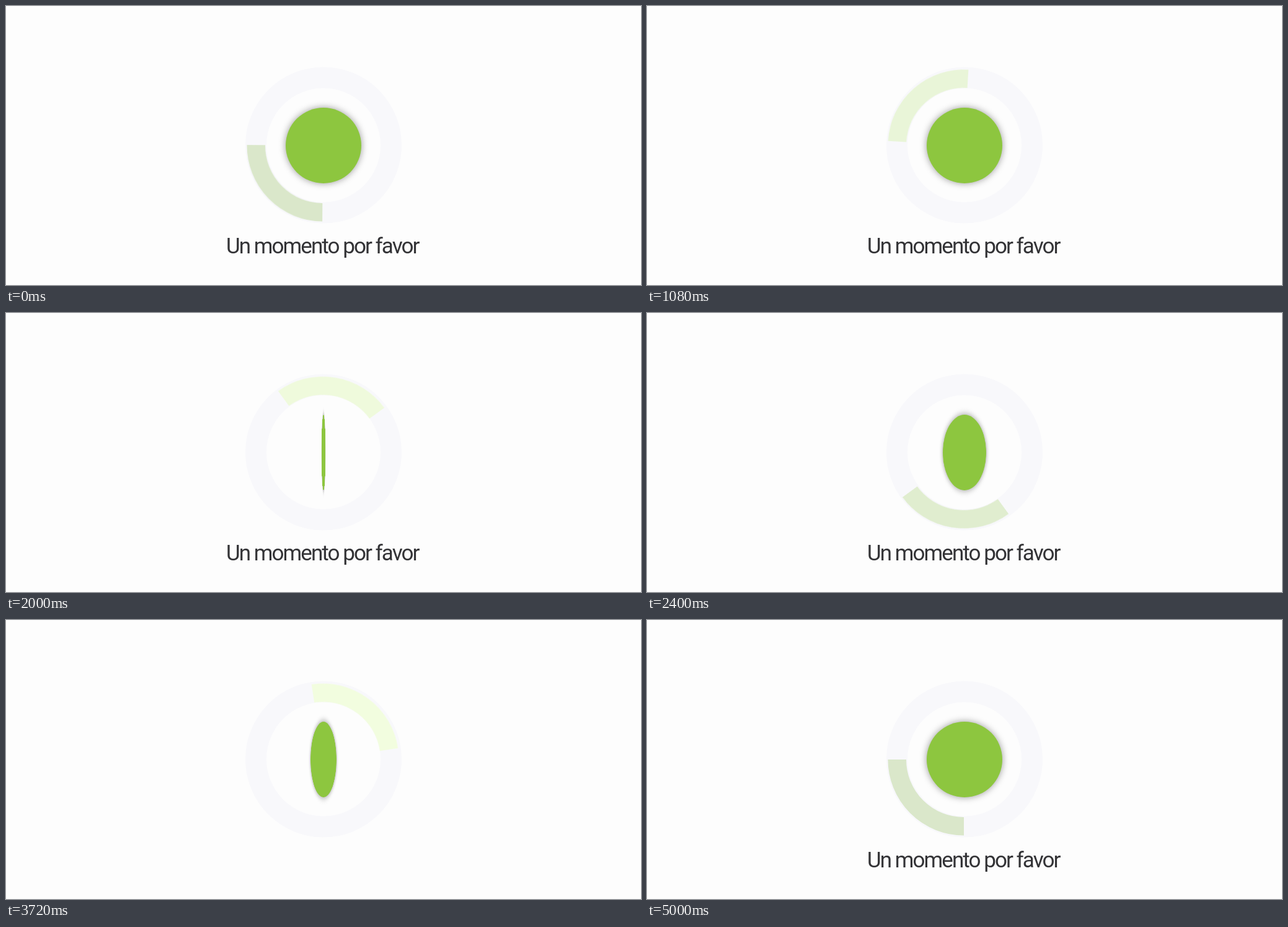
Write an HTML page that moves like this. It is 1024 by 450 pixels and loops after 5.04 s.

```html
<!DOCTYPE html>
<html lang="es">
<head>
<meta charset="utf-8">
<title>Un momento por favor</title>
<style>
  html, body {
    margin: 0;
    width: 100%;
    height: 100%;
    overflow: hidden;
    background: #fdfdfd;
  }
  svg { position: absolute; left: 0; top: 0; }

  .track, .arc { fill: none; }
  .track { stroke: #f8f8fb; stroke-width: 34; }
  .arc {
    stroke-width: 29.5;
    transform-origin: 511px 225px;
    animation: turn 5040ms linear infinite, tint 5040ms linear infinite;
  }
  .disc {
    position: absolute;
    left: 451px;
    top: 164px;
    width: 122px;
    height: 122px;
    border-radius: 50%;
    background: #8dc63f;
    box-shadow: 0 0 12px rgba(0, 0, 0, .4);
    animation: spin 5040ms linear infinite;
  }
  text {
    font: 400 35px Roboto, "Open Sans", sans-serif;
    letter-spacing: -1.95px;
    fill: #333336;
    animation: blink 5040ms step-end infinite;
  }

  /* six turns in five seconds, then a short rest */
  @keyframes turn {
    0% { transform: rotate(0deg); }
    21.429% { transform: rotate(453deg); }
    31.746% { transform: rotate(683.5deg); }
    47.619% { transform: rotate(1043.5deg); }
    61.111% { transform: rotate(1336.4deg); }
    73.81% { transform: rotate(1611deg); }
    99.206%, 100% { transform: rotate(2160deg); }
  }
  /* darkest at the start of each turn, palest halfway */
  @keyframes tint {
    0%, 16.534%, 33.069%, 49.603%, 66.138%, 82.672%, 99.206%, 100% { stroke: #dae7ca; }
    8.267%, 24.802%, 41.336%, 57.87%, 74.405%, 90.939% { stroke: #f4ffe1; }
  }
  @keyframes spin {
    0%, 21.5% { transform: rotateY(0deg); }
    96.84%, 100% { transform: rotateY(360deg); }
  }
  /* half a second on, half a second off */
  @keyframes blink {
    0%, 19.841%, 39.683%, 59.524%, 79.365%, 99.206%, 100% { opacity: 1; }
    9.921%, 29.762%, 49.603%, 69.444%, 89.286% { opacity: 0; }
  }
</style>
</head>
<body>
<svg width="1024" height="450" viewBox="0 0 1024 450">
  <circle class="track" cx="512" cy="224.5" r="109"/>
  <path class="arc" d="M403.25 225 A107.75 107.75 0 0 0 511 332.75"/>
  <text x="355" y="399">Un momento por favor</text>
</svg>
<div class="disc"></div>
</body>
</html>
```
